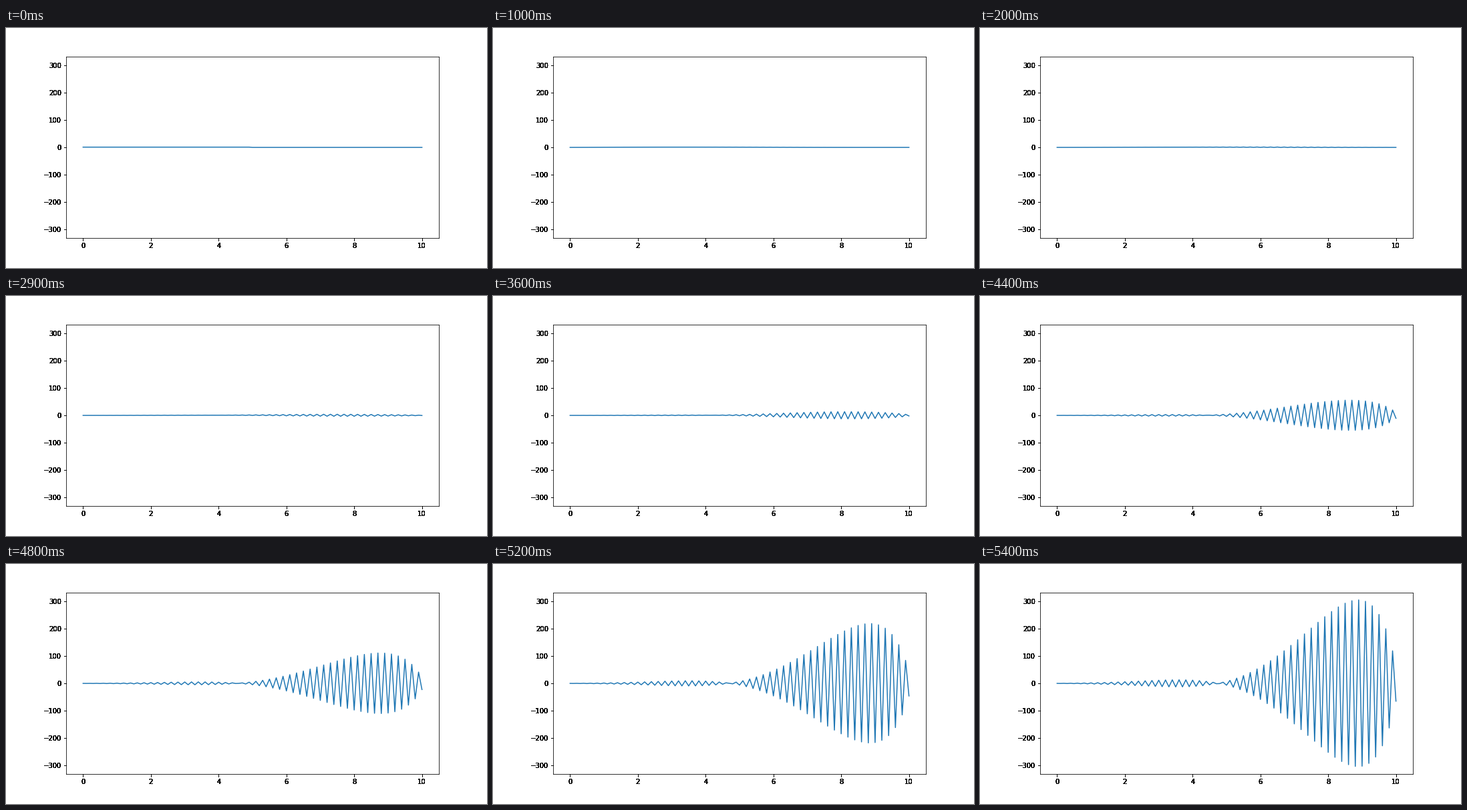
Recreate the animation shown at these times as a matplotlib script. Size 720 by 360 pixels, loop 5.5 s.

```python
import numpy as np
import matplotlib.pyplot as plt
from matplotlib.animation import FuncAnimation

FRAMES = 55
INTERVAL = 100          # ms
STEPS_PER_FRAME = 10
LABEL_PASSES = 8        # overlaid passes give the heavy, hard-edged labels

# Explicit upwind advection-diffusion, run 1 % above its stability limit
dx, speed, diffusion = 0.1, 1.0, 0.5
dt = 1.01 * dx**2 / (2 * diffusion + speed * dx)
courant = speed * dt / dx
fourier = diffusion * dt / dx**2


def step(u):
    """Advance one time step with zero values beyond both ends."""
    padded = np.pad(u, 1)
    left, right = padded[:-2], padded[2:]
    return ((fourier + courant) * left
            + (1 - 2 * fourier - courant) * u
            + fourier * right)


def solve(u):
    states = [u]
    for _ in range(FRAMES - 1):
        for _ in range(STEPS_PER_FRAME):
            u = step(u)
        states.append(u)
    return states


def style(ax):
    ax.set(xlim=(-0.5, 10.5), ylim=(-331.5, 331.5),
           xticks=range(0, 11, 2), yticks=range(-300, 301, 100))


x = np.linspace(0, 10, 101)
states = solve(np.where(np.arange(x.size) < 50, 1.0, 0.0))

plt.rcParams.update({"font.family": "DejaVu Sans", "font.size": 10})
fig = plt.figure(figsize=(10, 5), dpi=72, facecolor="white")
box = [0.125, 0.125, 0.775, 0.755]
ax = fig.add_axes(box)
style(ax)
for _ in range(LABEL_PASSES - 1):
    style(fig.add_axes(box, frameon=False))

line, = ax.plot(x, states[0], color="#1f77b4", lw=1.5)


def update(frame):
    line.set_ydata(states[frame])
    return line,


anim = FuncAnimation(fig, update, frames=FRAMES, interval=INTERVAL,
                     repeat=True, repeat_delay=0)
plt.show()
```
